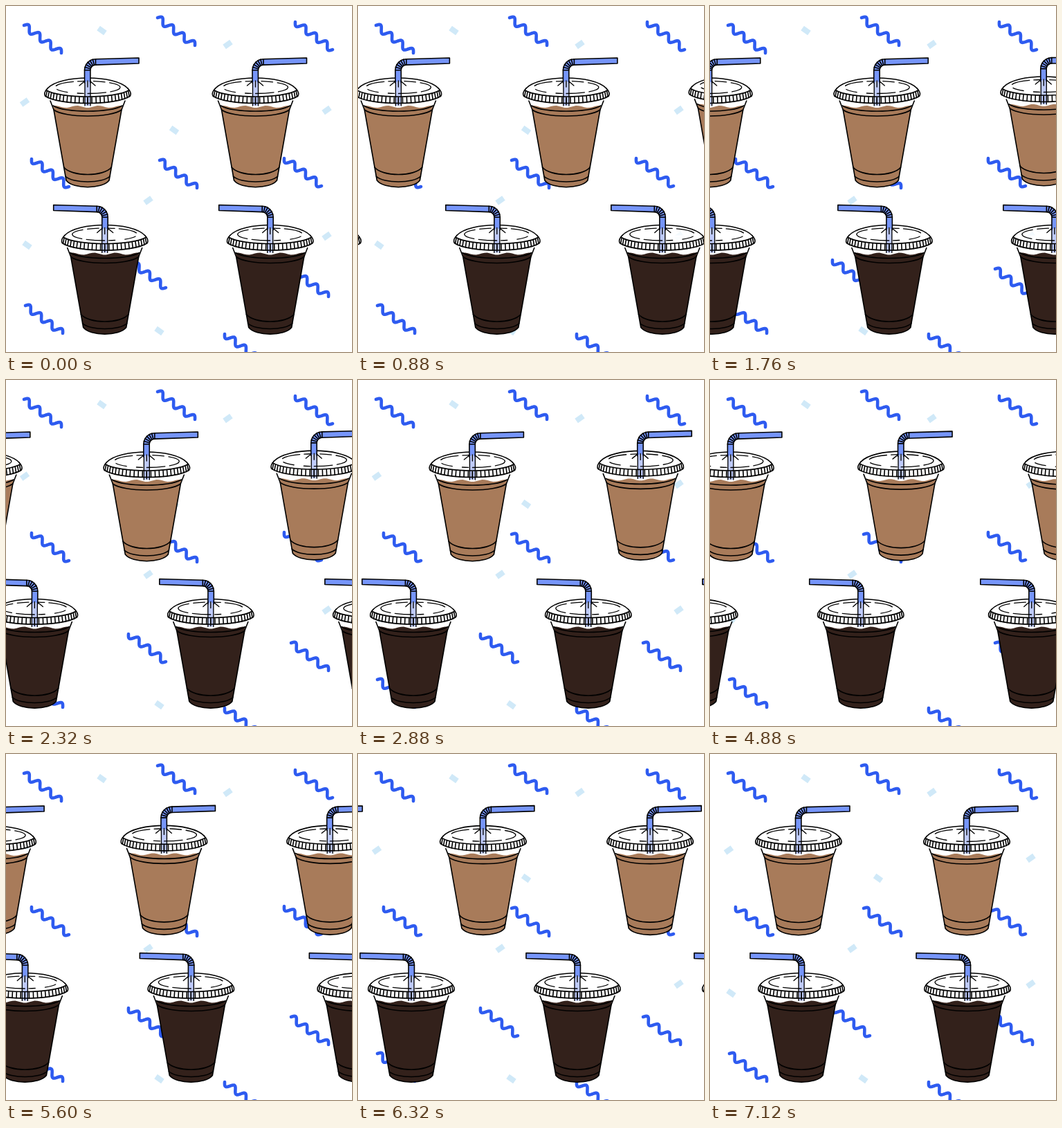
An HTML page for the animation above (7200 ms loop, 500 by 500 pixels).

```html
<!DOCTYPE html>
<html lang="en">
<head>
<meta charset="utf-8">
<title>Iced coffee parade</title>
<style>
html, body { margin: 0; width: 100%; height: 100%; overflow: hidden; background: #fff; }
svg { display: block; width: 100vw; height: 100vh; }
.line { fill: none; stroke: #000; stroke-width: 1.6; stroke-linecap: round; stroke-linejoin: round; }
.thin { stroke-width: 1.35; }
.milk { color: #a87b5a; }
.black { color: #33211b; }
</style>
</head>
<body>
<svg viewBox="0 0 500 500">
  <defs>
    <path id="wave" fill="none" stroke="#2e5bf0" stroke-width="4.6" stroke-linecap="round" stroke-linejoin="round"/>
    <rect id="chip" x="-6" y="-4" width="12" height="8" fill="#d0e9f8"/>
    <g id="cup"></g>
  </defs>
  <g id="confetti"></g>
  <g id="cups"></g>
</svg>
<script>
const LOOP = 7200, STEP = 80, TIP = 74;
const $ = id => document.getElementById(id);
const range = n => [...Array(n + 1).keys()];
const poly = pts => 'M' + pts.map(p => p.map(v => v.toFixed(2)).join(' ')).join('L');

function add(parent, tag, attrs) {
  const el = document.createElementNS('http://www.w3.org/2000/svg', tag);
  for (const k in attrs) el.setAttribute(k, attrs[k]);
  return parent.appendChild(el);
}
const use = (parent, id, attrs) => add(parent, 'use', { href: '#' + id, ...attrs });

// A bow is a shallow curve from (-w, y) to (w, y) that sags in the middle
const BEND = 0.68;
const bowTo = (w, y, sag) => `C${-BEND * w} ${y + sag / 0.75} ${BEND * w} ${y + sag / 0.75} ${w} ${y}`;
const bow = (w, y, sag) => `M${-w} ${y}` + bowTo(w, y, sag);
const onBow = (w, y, sag, t) => {
  const u = 1 - t;
  return [w * (t ** 3 - u ** 3 + 3 * BEND * t * u * (t - u)), y + 4 * sag * t * u];
};

// The cup stands around x = 0, straw to the right
function buildCup(g) {
  const fill = (d, color, alpha = 1) => add(g, 'path', { d, fill: color, 'fill-opacity': alpha });
  const line = (d, cls = '') => add(g, 'path', { d, class: 'line ' + cls });
  const half = y => 49 - 0.176 * (y - 150);

  const body = 'M-54 137L-49 150L-31 252' + bowTo(31, 252, 9.75) + 'L49 150L54 137';
  const surface = range(25).map(i => [50 - 4 * i, 145.5 + 1.5 * Math.cos((50 - 4 * i) / 5)]);
  fill(body, '#fff');
  fill(poly(surface) + 'L-49 150L-31 252' + bowTo(31, 252, 9.75) + 'L49 150Z', 'currentColor');
  line(body);
  for (const [y, sag] of [[144, 8], [150, 9], [233, 10.5], [246, 8]]) line(bow(half(y), y, sag));

  const dome = bow(58, 119, -15), upper = [60, 121.5, 9.5], lower = [61.5, 130, 10.5];
  const rim = 'M-58 119L-60 121.5Q-63.500 126 -61.500 130' + bowTo(...lower) + 'Q63.500 126 60 121.5L58 119';
  fill(dome + 'L60 121.5L-60 121.5Z', '#fff', 0.75);
  fill(rim + 'Z', '#fff', 0.9);
  fill('M-4 109H4V144H-4Z', '#b8c6fb', 0.9);
  line('M-4 110V144M4 110V144M0 133V143', 'thin');
  line(dome);
  line(rim);
  line(bow(...upper));
  for (const i of range(24)) {
    const t = (i + 0.5) / 25, [x, y] = onBow(...upper, t);
    line(poly([[x, y + 1], onBow(...lower, t)]));
  }
  add(g, 'ellipse', { cx: 0, cy: 117.5, rx: 47, ry: 9, class: 'line thin', 'stroke-dasharray': '16 7 26 6 9 14' });

  // Straw with a ribbed knee
  const knee = (r, a) => [11.5 - r * Math.cos(a), 92.7 - r * Math.sin(a)];
  const turn = range(6).map(i => i * Math.PI / 12);
  const outer = turn.map(a => knee(16, a)), inner = turn.map(a => knee(7.6, a));
  const straw = poly([[-4.5, 111], ...outer, [TIP, 75], [TIP, 83], ...inner.slice().reverse(), [4, 111]]);
  fill(straw + 'L0 108Z', '#7695fa');
  line(straw);
  outer.forEach((p, i) => line(poly([p, inner[i]])));
  line('M-12 115L-4 108.5M11 115L3.500 108.5M0 108V117', 'thin');
}

// Squiggle: a sine along a slanted axis, three and a half periods
const W = 54, H = 40, AMP = 4.6, len = Math.hypot(W, H);
$('wave').setAttribute('d', poly(range(70).map(i => {
  const t = i / 70, s = AMP * Math.sin(7 * Math.PI * t);
  return [W * t + s * H / len, H * t - s * W / len];
})));

function scatter(id, points, turn) {
  for (const [x, y] of points) use($('confetti'), id, { transform: `translate(${x} ${y}) ` + turn });
}
scatter('chip', [[138.5, 35.5], [243, 179.5], [30.5, 345.5], [221.5, 469.5]], 'rotate(35)');
scatter('chip', [[320.5, 55.5], [27, 139], [463.5, 150.5], [205.5, 281], [463.5, 332.5]], 'rotate(-35)');
scatter('wave', [[26, 28], [219, 17], [222, 223], [28, 433], [412, 380]], '');
scatter('wave', [[418, 23], [37, 221], [402, 220], [177, 367], [316, 474]], `rotate(180 ${W / 2} ${H / 2})`);

// Cups travel in pairs: first straw tip x, gap and speed in px/s; late is the second cup's speed change
const pairs = [
  { kind: 'milk', x: 192, gap: 242.5, v: -67.75 },
  { kind: 'milk', x: 672.6, gap: 227.4, v: -66.1, late: 2.2, rise: 2.7 },
  { kind: 'black', x: 68, gap: 239, v: 66 },
  { kind: 'black', x: -433.2, gap: 240, v: 68.9 }
];
buildCup($('cup'));
const cups = pairs.flatMap(({ kind, x, gap, v, late = 0, rise = 0 }) => [0, 1].map(k => ({
  el: use($('cups'), 'cup', { class: kind }),
  low: kind === 'black', x: x + k * gap, v: v + k * late, rise
})));

function draw(ms) {
  const t = Math.floor(ms % LOOP / STEP) * STEP;
  for (const { el, low, x, v, rise } of cups) {
    const tip = x + v * t / 1000, y = -rise * (1 - t / LOOP);
    el.setAttribute('transform', low
      ? `translate(${tip + TIP + 0.7} ${y + 212.5}) scale(-1 1)`
      : `translate(${tip - TIP} ${y})`);
  }
}

let start;
function tick(now) {
  start ??= now;
  draw(now - start);
  requestAnimationFrame(tick);
}
draw(0);
requestAnimationFrame(tick);
</script>
</body>
</html>
```
